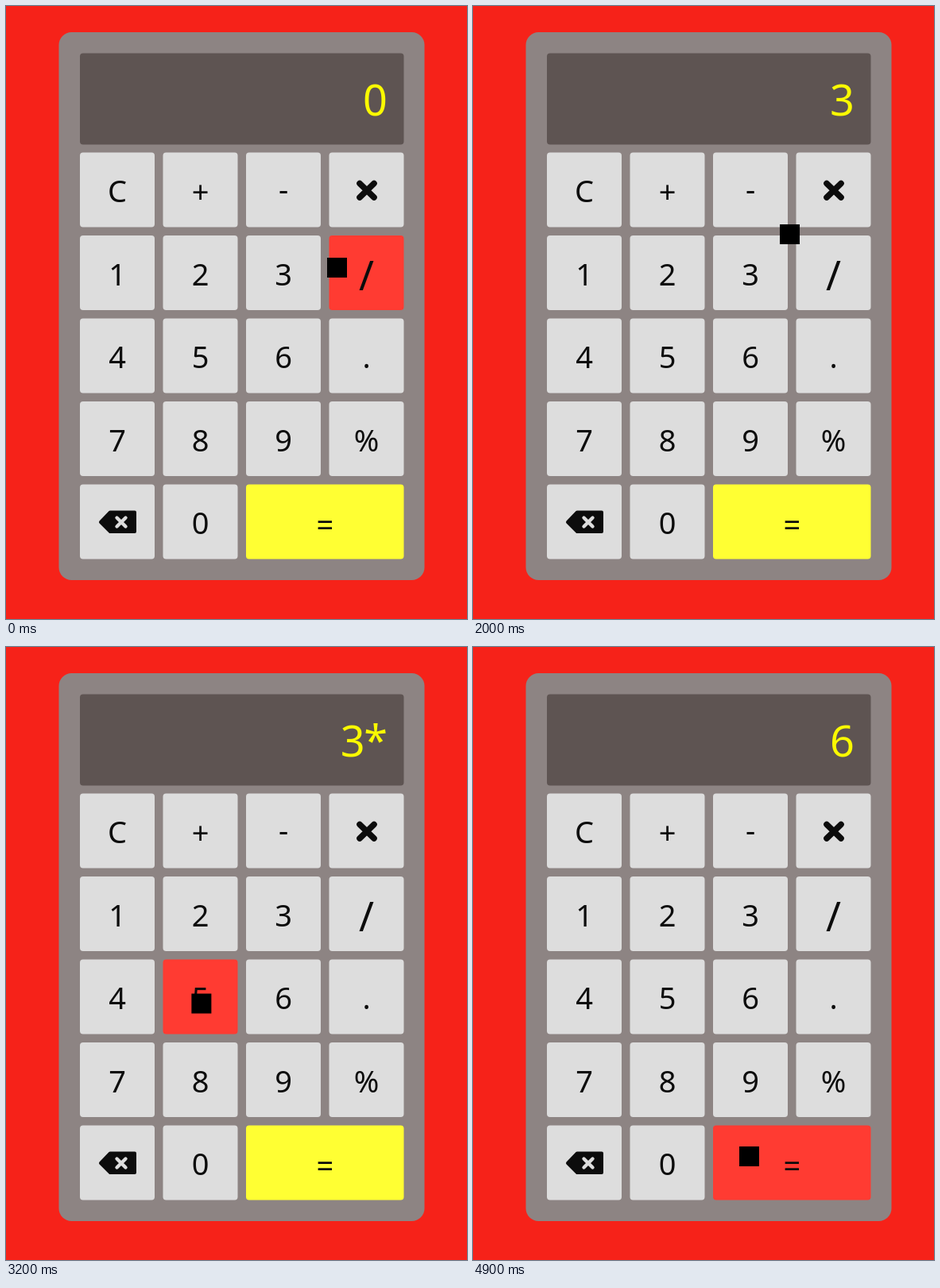
An HTML page for the animation above (5000 ms loop, 580 by 772 pixels).

```html
<!DOCTYPE html>
<html lang="en">
<head>
<meta charset="utf-8">
<title>Calculator</title>
<style>
  html, body { margin: 0; width: 100%; height: 100%; overflow: hidden; background: #f62219; }
  svg { display: block; width: 580px; height: 772px; }
  text { font: 38px "Noto Sans", "Open Sans", sans-serif; text-anchor: middle; fill: #0c0c0c; }
  .slash { font-size: 51px; font-weight: 300; }
  #readout { font-size: 54px; letter-spacing: -1.5px; text-anchor: end; fill: #fafa00; }
  .key { fill: #dddddd; }
  .equals { fill: #ffff33; }
  .hover { fill: #ff3b32; }
</style>
</head>
<body>
<svg viewBox="0 0 580 772">
  <rect width="580" height="772" fill="#f62219"/>
  <rect x="66.5" y="33" width="460" height="690" rx="16" fill="#8d8483"/>
  <rect x="93" y="59.5" width="407.5" height="115" rx="4" fill="#5e5452"/>
  <text id="readout" x="478.5" y="138"></text>
  <g id="keys"></g>
  <path d="M445 223.5l18 17.5m0-17.5l-18 17.5" stroke="#0c0c0c" stroke-width="7.6" stroke-linecap="round"/>
  <path d="M119 650l12-12.5H162V662H131Z" fill="#0c0c0c" stroke="#0c0c0c" stroke-width="4" stroke-linejoin="round"/>
  <path d="M139.5 644.5l11 11m0-11l-11 11" stroke="#dddddd" stroke-width="4.4" stroke-linecap="round"/>
  <rect id="pointer" width="25" height="25"/>
</svg>
<script>
const NS = 'http://www.w3.org/2000/svg';
const LOOP = 5000, STEP = 100, HOVER_LAG = 25;
const PITCH = 104.5, KEY = 94;
const hotspot = { x: 12, y: 1 };

const rows = ['C+-×', '123/', '456.', '789%', '⌫0='];
const icons = '×⌫';
const baselineShift = { '+': 1, '-': -2, '/': 6, '=': 2 };

// The pointer rests at home, then eases from stop to stop
const home = { x: 404, y: 317 };
const moves = [
  { from: 400, to: 900, x: 349, y: 320 },
  { from: 1400, to: 2600, x: 423, y: 230 },
  { from: 2550, to: 2760, x: 230, y: 464 },
  { from: 3000, to: 3600, x: 243, y: 358 },
  { from: 3600, to: 4270, x: 335, y: 629 }
];

const readings = [[0, '0'], [1500, '3'], [2400, '3*'], [3700, '3*2'], [4900, '6']];

const clamp = k => Math.min(1, Math.max(0, k));
const smooth = k => k * k * (3 - 2 * k);

const make = (tag, attrs, parent) => {
  const el = document.createElementNS(NS, tag);
  for (const name in attrs) el.setAttribute(name, attrs[name]);
  return parent.appendChild(el);
};

const group = document.getElementById('keys');
const readout = document.getElementById('readout');
const pointer = document.getElementById('pointer');

const keys = rows.flatMap((row, r) => [...row].map((label, c) => {
  const wide = label === '=';
  const x = 93 + PITCH * c, y = 184.6 + PITCH * r;
  const w = wide ? PITCH + KEY : KEY, h = KEY;
  const el = make('rect', { x, y, width: w, height: h, rx: 4, class: wide ? 'equals' : 'key' }, group);
  if (!icons.includes(label)) {
    const baseline = y + 62.4 + (baselineShift[label] || 0);
    const style = label === '/' ? 'slash' : '';
    make('text', { x: x + w / 2, y: baseline, class: style }, group).textContent = label;
  }
  return { x, y, w, h, el };
}));

function pointerAt(t) {
  return moves.reduce((p, m) => {
    const k = smooth(clamp((t - m.from) / (m.to - m.from)));
    return { x: p.x + (m.x - p.x) * k, y: p.y + (m.y - p.y) * k };
  }, home);
}

function draw(t) {
  const p = pointerAt(t);
  pointer.setAttribute('x', p.x);
  pointer.setAttribute('y', p.y);

  // The highlight trails the pointer slightly
  const late = pointerAt(t - HOVER_LAG);
  const hx = late.x + hotspot.x, hy = late.y + hotspot.y;
  for (const { x, y, w, h, el } of keys) {
    el.classList.toggle('hover', hx >= x && hx <= x + w && hy >= y && hy <= y + h);
  }

  readout.textContent = readings.filter(([time]) => time <= t).pop()[1];
}

const start = performance.now();
function tick() {
  const t = (performance.now() - start) % LOOP;
  draw(Math.floor(t / STEP) * STEP);
  requestAnimationFrame(tick);
}
tick();
</script>
</body>
</html>
```
